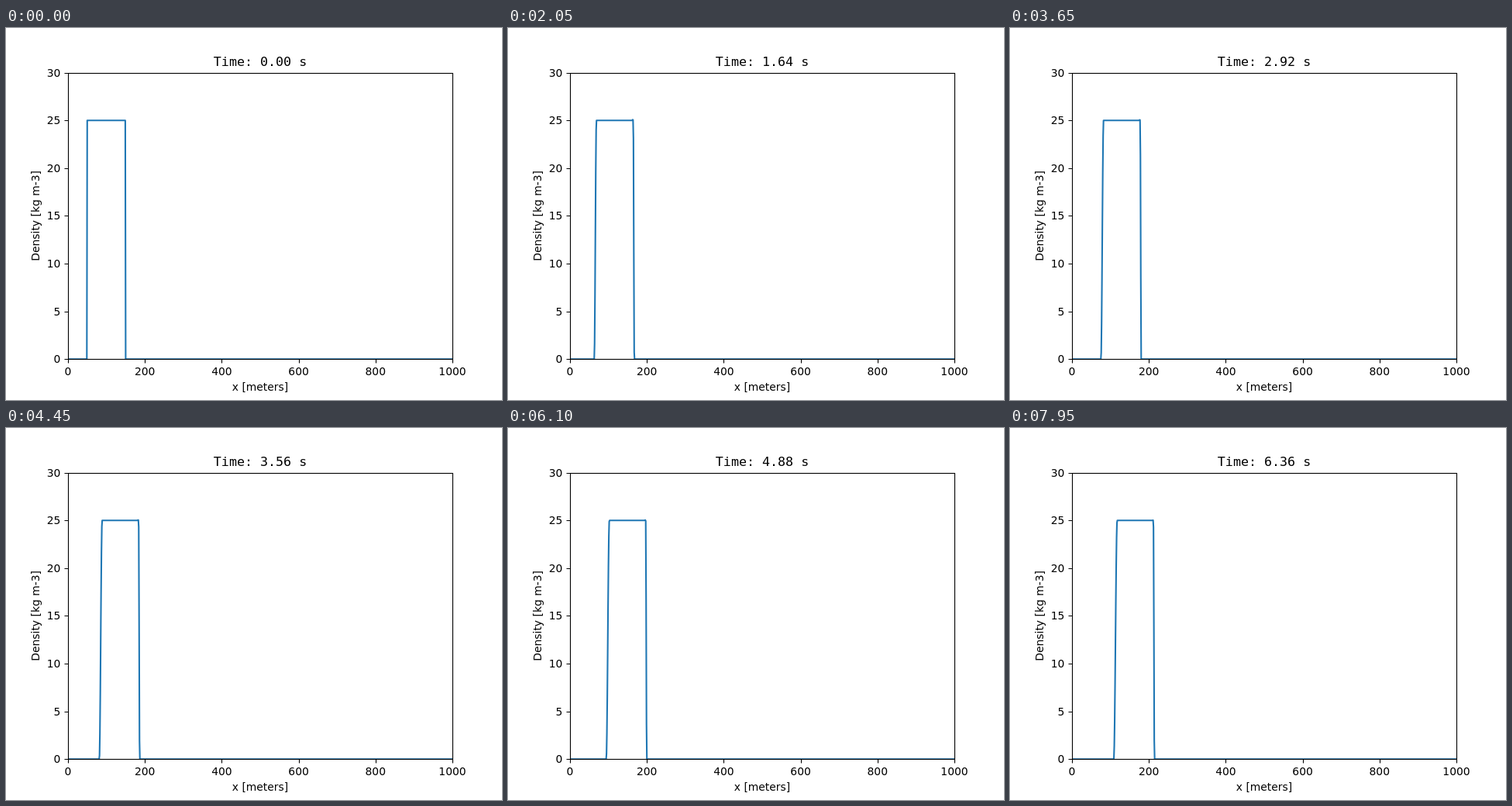
Animation of 640x480 px, one loop 8 s. Source, as an HTML page:

```html
<!DOCTYPE html>
<html lang="en">
<head>
<meta charset="utf-8">
<title>Density transport</title>
<style>
  html, body { margin: 0; width: 100%; height: 100%; overflow: hidden; background: #fff; }
  svg { display: block; width: 640px; height: 480px; }
  text { font: 13.89px "DejaVu Sans", sans-serif; text-anchor: middle; }
  .end text { text-anchor: end; }
  #title { font: 16.67px "DejaVu Sans Mono", monospace; }
  .axis { fill: none; stroke: #000; stroke-width: 1.11; }
  #curve { fill: none; stroke: #1f77b4; stroke-width: 2.083; stroke-linejoin: round; }
</style>
</head>
<body>
<svg viewBox="0 0 640 480">
  <clipPath id="plot"><rect x="80" y="58" width="496" height="370"/></clipPath>
  <path id="curve" clip-path="url(#plot)"/>
  <path id="ticks" class="axis"/>
  <rect class="axis" x="80.5" y="58.5" width="496" height="369"/>
  <g id="xLabels"></g>
  <g id="yLabels" class="end"></g>
  <text x="328" y="468">x [meters]</text>
  <text transform="translate(43 242.4) rotate(-90)">Density [kg m-3]</text>
  <text id="title" x="328" y="49"></text>
</svg>
<script>
const LOOP = 8000, STEP = 50, SPEED = 10, PEAK = 25;
const $ = id => document.getElementById(id);
const px = x => 80 + x * 0.496;
const py = y => 427.2 - y * 12.32;
const snap = v => Math.round(v) + 0.5;

function label(group, x, y, value) {
  const el = document.createElementNS("http://www.w3.org/2000/svg", "text");
  el.setAttribute("x", x);
  el.setAttribute("y", y);
  el.textContent = value;
  $(group).append(el);
}

function drawAxes() {
  let d = "";
  for (let x = 0; x <= 1000; x += 200) {
    d += `M${snap(px(x))} 427.5v5`;
    label("xLabels", px(x), 448, x);
  }
  for (let y = 0; y <= 30; y += 5) {
    d += `M80.5 ${snap(py(y))}h-5`;
    label("yLabels", 70.3, Math.round(py(y) + 5.1), y);
  }
  $("ticks").setAttribute("d", d);
}

// Smooth rise from 0 to 1 over [-w, w]
function ramp(d, w) {
  const k = Math.max(-1, Math.min(1, d / Math.max(w, 0.01)));
  return 0.5 + 0.5 * Math.sin(k * Math.PI / 2);
}

// The trailing edge spreads while the leading edge stays steep
function density(x, t) {
  const tail = 49.5 + SPEED * t, front = 149.5 + SPEED * t;
  const tailWidth = 2.4 * Math.cbrt(t);
  const frontWidth = 1.4 * Math.min(1, t * 5);
  const bump = 0.09 * Math.min(1, t * 2) * Math.max(0, 1 - t / 7)
    * Math.exp(-(((x - front + 2.5) / 1.5) ** 2));
  return (PEAK + bump) * ramp(x - tail, tailWidth) * ramp(front - x, frontWidth);
}

function render(ms) {
  const t = Math.floor((ms % LOOP) / STEP) * 0.04;
  const points = [];
  for (let x = 0; x <= 1000; x++) {
    points.push(px(x).toFixed(2) + " " + py(density(x, t)).toFixed(2));
  }
  $("curve").setAttribute("d", "M" + points.join("L"));
  $("title").textContent = `Time: ${t.toFixed(2)} s`;
}

drawAxes();
const start = performance.now();
function tick() {
  render(performance.now() - start);
  requestAnimationFrame(tick);
}
tick();
</script>
</body>
</html>
```
